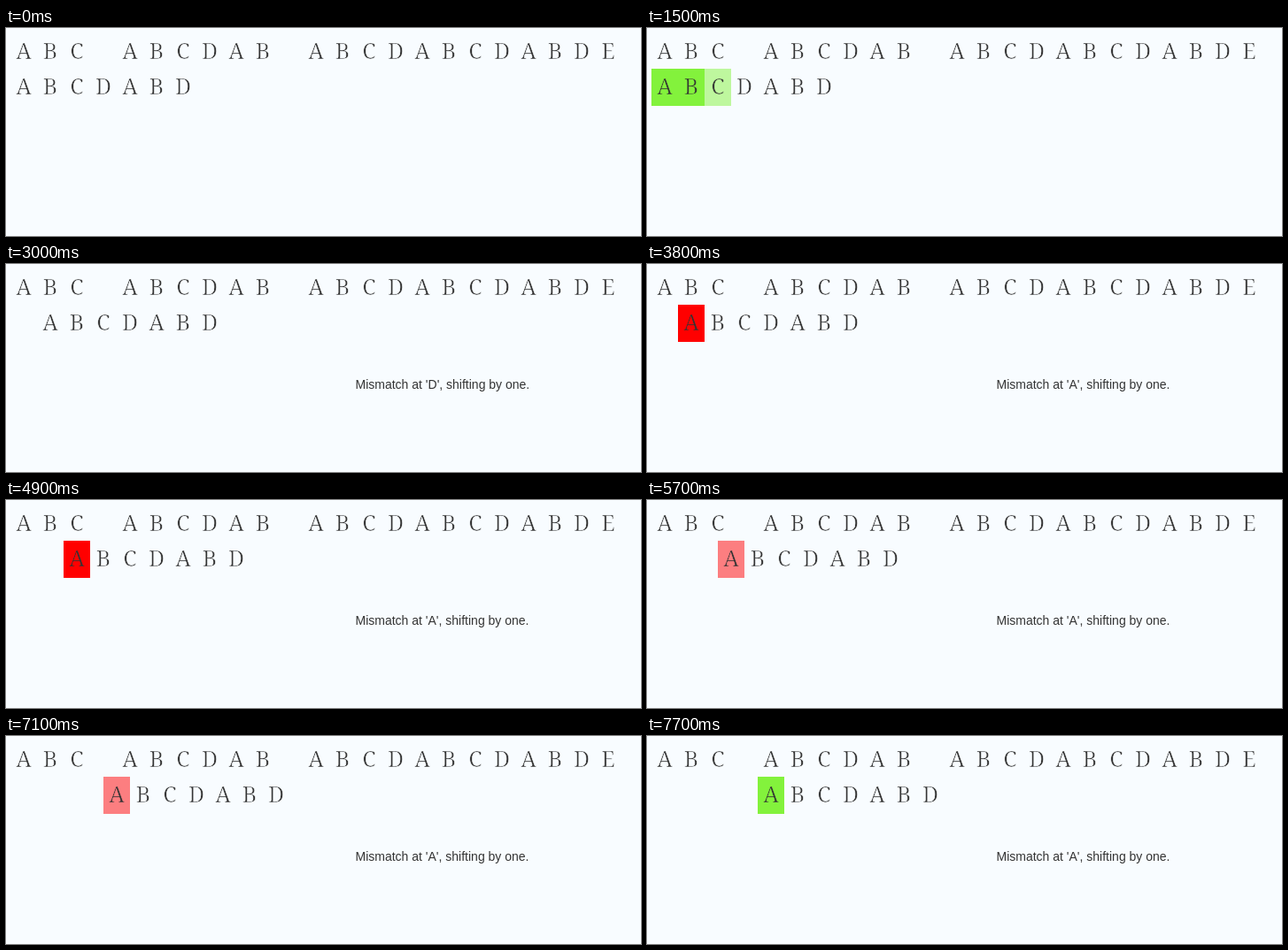
Recreate the animation shown at these times as an HTML page. Size 717 px wide and 235 px high, loop 8000 ms.

```html
<!DOCTYPE html>
<html lang="en">
<head>
<meta charset="utf-8">
<title>String search</title>
<style>
  html, body { margin: 0; width: 100%; height: 100%; overflow: hidden; background: #f8fcff; }
  svg { display: block; }
  text { fill: #333; }
  /* The cell colour outlines each letter, which thins its strokes */
  .cell { color: #f8fcff; }
  .cell rect { fill: currentColor; }
  .cell text {
    font: 300 25px "Noto Serif", serif;
    text-anchor: middle;
    stroke: currentColor;
    stroke-width: 0.7px;
  }
  #note { font: 14px "Liberation Sans", Arial, sans-serif; }
</style>
</head>
<body>
<svg width="717" height="235" viewBox="0 0 717 235">
  <g id="haystack"></g>
  <g id="needle"></g>
  <text id="note" x="394.5" y="141"></text>
</svg>
<script>
const LOOP = 8000, TICK = 100, CELL = 30, LEFT = 5;
const PAPER = '#f8fcff', GREEN = '#83f23c', RED = '#f00';
const $ = id => document.getElementById(id);

// Each shift: start time, number of ticks
const shifts = [[2800, 3], [4200, 4], [5600, 4], [7000, 4]];

// Each mark: cell, colour, start time, ticks, index of the shift that clears it
const marks = [
  [0, GREEN, 500, 3, 0],
  [1, GREEN, 1000, 2, 0],
  [2, GREEN, 1500, 2, 0],
  [3, RED, 1900, 3, 0],
  [0, RED, 3300, 3, 1],
  [0, RED, 4700, 3, 2],
  [0, RED, 6100, 3, 3],
  [0, GREEN, 7500, 3]
];

function add(parent, tag, attrs, content = '') {
  const el = document.createElementNS('http://www.w3.org/2000/svg', tag);
  for (const name in attrs) el.setAttribute(name, attrs[name]);
  el.textContent = content;
  return parent.appendChild(el);
}

function write(row, letters, top) {
  return [...letters].map((c, i) => {
    const cell = add(row, 'g', { class: 'cell' });
    const x = LEFT + i * CELL;
    add(cell, 'rect', { x, y: top, width: CELL, height: 42 });
    add(cell, 'text', { x: x + CELL / 2, y: top + 29 }, c);
    return cell;
  });
}

// Eased progress that advances once per tick
function progress(t, [start, ticks]) {
  const p = (Math.floor((t - start) / TICK) + 1) / ticks;
  return 0.5 - Math.cos(Math.PI * Math.min(1, Math.max(0, p))) / 2;
}

write($('haystack'), 'ABC ABCDAB ABCDABCDABDE', 6);
const cells = write($('needle'), 'ABCDABD', 46);

function draw(now) {
  const t = now % LOOP;
  const moved = shifts.map(s => progress(t, s));
  const offset = CELL * moved.reduce((a, b) => a + b, 0);
  $('needle').setAttribute('transform', `translate(${offset} 0)`);
  cells.forEach(cell => cell.style.color = PAPER);
  for (const [cell, colour, start, ticks, cleared] of marks) {
    const shown = progress(t, [start, ticks]) * (1 - (moved[cleared] ?? 0));
    if (shown > 0) {
      cells[cell].style.color = `color-mix(in srgb, ${colour} ${shown * 100}%, ${PAPER})`;
    }
  }
  $('note').textContent = t < 2400 ? '' : `Mismatch at '${t < 3800 ? 'D' : 'A'}', shifting by one.`;
}

function frame() {
  draw(performance.now());
  requestAnimationFrame(frame);
}
frame();
</script>
</body>
</html>
```
